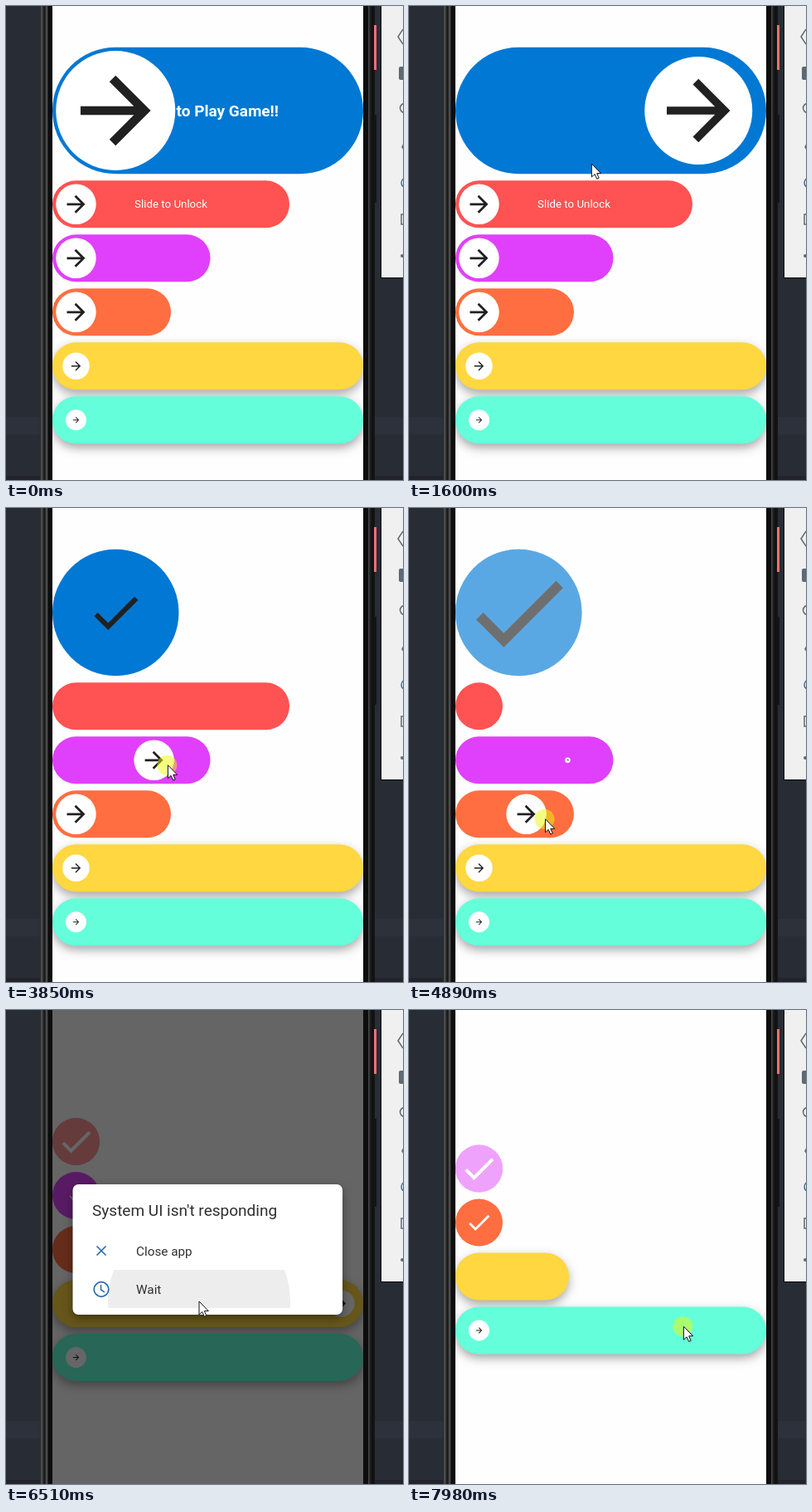
An HTML page with a canvas for the animation above (8000 ms loop, 479 by 571 pixels).

```html
<!DOCTYPE html>
<html lang="en">
<head>
<meta charset="utf-8">
<title>Slide buttons</title>
<style>
  html, body { margin: 0; width: 100%; height: 100%; overflow: hidden; background: #282c34; }
  canvas { display: block; width: 479px; height: 571px; }
</style>
</head>
<body>
<canvas id="stage" width="479" height="571"></canvas>
<script>
const LOOP = 8000, LEFT = 56, WIDTH = 375, GAP = 8, MIDDLE = 288.5;
const STEP = 1000, TICK = 900, FADE = 3235, LAG = 60, REST = 150;
const ctx = document.getElementById('stage').getContext('2d');

const ARROW = new Path2D('M12 4l-1.41 1.41L16.17 11H4v2h12.17l-5.58 5.59L12 20l8-8z');
const CHECK = new Path2D('M9 16.17L4.83 12l-1.42 1.41L9 19 21 7l-1.41-1.41z');
const POINTER = new Path2D('M0 0V16L3.7 12.6L6.3 18.3L8.8 17.2L6.3 11.6H11.3Z');

// press and release bound the drag; at finish the knob starts to shrink
const sliders = [
  { color: '#0078d4', height: 152.5, knob: 72, icon: 127, tick: 143, tickColor: '#212121',
    text: 'Slide to Play Game!!', font: 'bold 19px', press: 430, release: 1240, travel: 224, finish: 1305 },
  { color: '#ff5252', width: 286, text: 'Slide to Unlock', font: '13.3px',
    press: 2000, release: 2500, travel: 224, finish: 2900 },
  { color: '#e040fb', width: 190.5, press: 3350, release: 3950, travel: 128, finish: 4230 },
  { color: '#ff6e40', width: 143, press: 4650, release: 4910, travel: 82, finish: 5190 },
  { color: '#ffd740', knob: 16.25, icon: 17, raised: true, press: 5480, release: 5868, travel: 320, finish: 6415 },
  { color: '#64ffda', knob: 12.5, icon: 11, raised: true, press: 7500, release: LOOP, travel: 0, finish: LOOP },
].map(s => ({ width: WIDTH, height: 57, knob: 24.25, icon: 33, tick: 48, tickColor: '#fff', ...s }));

const clamp = v => Math.min(1, Math.max(0, v));
const span = (t, start, length) => clamp((t - start) / length);
const mix = (a, b, k) => a + (b - a) * k;
const slowMiddle = t => .5 + 4 * (t - .5) ** 3;
const inOutCirc = t => t < .5
  ? (1 - Math.sqrt(1 - 4 * t * t)) / 2
  : (1 + Math.sqrt(1 - (2 - 2 * t) ** 2)) / 2;

// The column stays centred while finished sliders drop out.
function layout(t) {
  const shown = sliders.filter(s => t < s.finish + FADE + STEP);
  let top = MIDDLE - shown.reduce((sum, s) => sum + s.height + GAP, -GAP) / 2;
  return shown.map(slider => {
    const row = { slider, top };
    top += slider.height + GAP;
    return row;
  });
}

// Pointer route: wait on each knob, drag it, rest, then tap the dialog and take the last knob.
const route = [{ at: 20, x: 436, y: 530 }];
const via = (at, x, y) => route.push({ at, x, y });
for (const s of sliders.filter(s => s.travel)) {
  const x = LEFT + s.height / 2 + 4;
  const y = layout(s.press).find(row => row.slider === s).top + s.height / 2 + 6;
  via(s.press - 200, x, y);
  via(s.press, x, y);
  via(s.release, x + s.travel, y);
  via(s.release + REST, x + s.travel, y);
}
via(6380, 233, 351);
via(6560, 233, 351);
via(7500, 88, 386);
via(LOOP, 341, 381);

function box(x, y, w, h, color) {
  ctx.fillStyle = color;
  ctx.fillRect(x, y, w, h);
}

function pill(x, y, w, h, r, color) {
  ctx.fillStyle = color;
  ctx.beginPath();
  ctx.roundRect(x, y, w, h, r);
  ctx.fill();
}

function disc(x, y, r, color) {
  ctx.fillStyle = color;
  ctx.beginPath();
  ctx.arc(x, y, r, 0, 2 * Math.PI);
  ctx.fill();
}

function ring(x, y, r, color, weight) {
  ctx.strokeStyle = color;
  ctx.lineWidth = weight;
  ctx.beginPath();
  ctx.arc(x, y, r, 0, 2 * Math.PI);
  ctx.stroke();
}

function line(color, weight, ...points) {
  ctx.strokeStyle = color;
  ctx.lineWidth = weight;
  ctx.beginPath();
  points.forEach(([x, y]) => ctx.lineTo(x, y));
  ctx.stroke();
}

function glyph(path, x, y, size, color) {
  ctx.save();
  ctx.translate(x, y);
  ctx.scale(size / 24, size / 24);
  ctx.translate(-12, -12);
  ctx.fillStyle = color;
  ctx.fill(path);
  ctx.restore();
}

function label(text, x, y, font, color, align = 'left') {
  ctx.font = font + ' Roboto, sans-serif';
  ctx.textAlign = align;
  ctx.fillStyle = color;
  ctx.fillText(text, x, y);
}

function shadow(color, blur, dy) {
  ctx.shadowColor = color;
  ctx.shadowBlur = blur;
  ctx.shadowOffsetY = dy;
}

function bezel(x, w, ...colors) {
  const metal = ctx.createLinearGradient(x, 0, x + w, 0);
  colors.forEach((color, i) => metal.addColorStop(i / (colors.length - 1), color));
  box(x, 0, w, 571, metal);
}

function drawDesktop() {
  box(0, 0, 479, 571, '#282c34');
  box(0, 495, 479, 21, '#2c313c');
  box(0, 566, 479, 5, '#22232d');

  bezel(41, 10, '#1c1c1d', '#58595a', '#262627', '#161617', '#5c5d5e', '#101011');
  box(51, 0, 5, 571, '#0d0d0e');
  box(431, 0, 6, 571, '#0d0d0e');
  bezel(437, 8, '#4c4d4e', '#1c1c1d', '#101011', '#161617');
  box(444, 23, 3, 54, '#f2706c');
  box(444, 131, 3, 106, '#141416');

  box(452, 0, 27, 328, '#0b0b0c');
  box(453, 0, 26, 327, '#f0f0f0');
  const ink = '#5c6a73';
  line(ink, 1.5, [479, 28], [473, 37], [479, 46]);
  pill(474, 73, 12, 16, 2, ink);
  ring(481, 123, 5.5, ink, 1.5);
  line(ink, 1.5, [480, 166], [478, 170], [480, 173]);
  ring(483, 213, 6, '#3c6d94', 1.5);
  line(ink, 1.5, [479, 251], [477, 251], [477, 263], [479, 263]);
  disc(478, 301, 2, ink);
}

function drawSlider(s, top, t) {
  const shrink = inOutCirc(span(t, s.finish, STEP));
  const collapse = inOutCirc(span(t, s.finish + STEP, STEP));
  const tick = span(t, s.finish + 2 * STEP, TICK);
  const faded = span(t, s.finish + FADE, STEP);
  const moved = span(t - LAG, s.press, s.release - s.press);
  const home = LEFT + s.height / 2, cy = top + s.height / 2;
  const cover = color => pill(LEFT, top, mix(s.width, s.height, collapse), s.height, s.height / 2, color);

  ctx.save();
  if (s.raised) shadow('rgba(0,0,0,.34)', 12, 5);
  cover(s.color);
  ctx.restore();

  if (s.text) {
    ctx.globalAlpha = 1 - moved;
    label(s.text, LEFT + s.width / 2, cy + s.height / 38 + 3.2, s.font, '#fff', 'center');
    ctx.globalAlpha = 1;
  }
  if (shrink < 1) {
    // the left edge of the knob stays put as it shrinks
    const cx = home + s.travel * moved - s.knob * shrink;
    disc(cx, cy, s.knob * (1 - shrink), '#fff');
    glyph(ARROW, cx, cy, s.icon * (1 - shrink), '#212121');
  }
  if (tick > 0) glyph(CHECK, home, cy, s.tick * slowMiddle(tick), s.tickColor);
  if (faded > 0) cover(`rgba(254,254,254,${faded})`);
}

function drawScreen(t) {
  ctx.save();
  ctx.beginPath();
  ctx.rect(LEFT, 0, WIDTH, 571);
  ctx.clip();
  box(LEFT, 0, WIDTH, 571, '#fefefe');
  for (const { slider, top } of layout(t)) drawSlider(slider, top, t);
  const dim = .6 * span(t, 5643, 267) * (1 - span(t, 6640, 260));
  box(LEFT, 0, WIDTH, 571, `rgba(0,0,0,${dim})`);
  ctx.restore();
}

function drawDialog(t) {
  const blue = '#2669b0', ink = '#303030';
  ctx.save();
  ctx.globalAlpha = span(t, 5640, 160) * (1 - span(t, 6640, 160));
  ctx.save();
  shadow('rgba(0,0,0,.4)', 12, 4);
  pill(80.5, 210, 325.5, 157, 7, '#fff');
  ctx.restore();

  if (t > 6380) {
    ctx.save();
    ctx.beginPath();
    ctx.rect(80.5, 313, 325.5, 46);
    ctx.clip();
    disc(233, 352, .84 * (t - 6380), '#ededed');
    ctx.restore();
  }

  label("System UI isn't responding", 104, 247.7, '19.05px', ink);
  label('Close app', 157, 296, '15.3px', ink);
  label('Wait', 157, 342, '15.3px', ink);
  line(blue, 1.6, [109.5, 284.5], [120.5, 295.5]);
  line(blue, 1.6, [120.5, 284.5], [109.5, 295.5]);
  ring(115, 336.5, 8.8, blue, 1.7);
  line(blue, 1.5, [114.5, 331], [114.5, 337], [119, 339.8]);
  ctx.restore();
}

function drawPointer(t) {
  const next = route.findIndex(p => p.at > t);
  if (next < 1) return;
  const a = route[next - 1], b = route[next];
  const k = span(t, a.at, b.at - a.at);
  const x = mix(a.x, b.x, k), y = mix(a.y, b.y, k);
  if (sliders.some(s => t >= s.press && t < s.release)) disc(x - 1, y, 12, 'rgba(235,249,6,.5)');
  ctx.save();
  ctx.translate(x, y);
  ctx.fillStyle = '#fff';
  ctx.fill(POINTER);
  ctx.strokeStyle = '#111';
  ctx.lineWidth = 1;
  ctx.stroke(POINTER);
  ctx.restore();
}

const began = performance.now();
function frame() {
  const t = (performance.now() - began) % LOOP;
  drawDesktop();
  drawScreen(t);
  drawDialog(t);
  drawPointer(t);
  requestAnimationFrame(frame);
}
frame();
</script>
</body>
</html>
```
